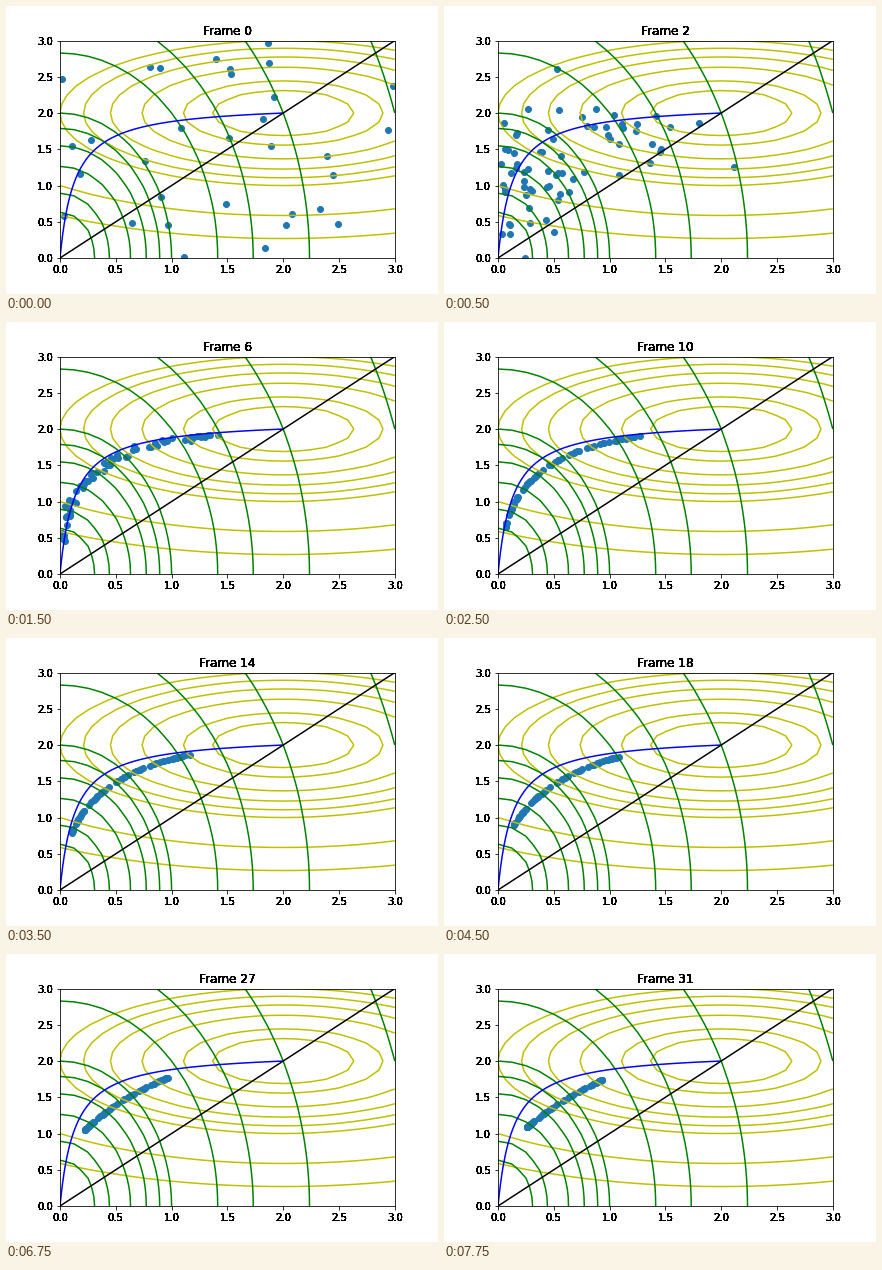
Write a matplotlib script that moves like this. It is 432 px wide and 288 px high and loops after 8 s.

```python
import numpy as np
import matplotlib.pyplot as plt
from matplotlib.animation import FuncAnimation

FRAMES, INTERVAL = 32, 250
LEVELS = [0.4, 0.8, 1.6, 2.4, 3.2, 4, 8, 12, 20, 40]
SETTLED = 6  # the frame by which the population lies on its arc

rng = np.random.default_rng(7)
start = rng.uniform(0, 3, (32, 2))
place = np.r_[0, np.sort(rng.random(68)), 1]
scatter = 0.3 * rng.standard_t(4, (len(place), 2))


def arc(age, t):
    """Quadratic Bezier arc that shortens and straightens with age."""
    shrink, bend = np.exp(-age / 13), np.exp(-age / 10)
    first = np.array([0.03 + 0.0092 * age, 1.2 - 0.76 * shrink])
    last = np.array([0.85 + 0.58 * shrink, 1.93 - 0.0076 * age])
    control = (first + last) / 2 + bend * np.array([-0.68, 0.62])
    t = t[:, None]
    return (1 - t) ** 2 * first + 2 * t * (1 - t) * control + t ** 2 * last


def population(frame):
    if frame == 0:
        return start
    age = max(0, frame - SETTLED)
    # Points drift towards both ends of the arc
    pull = 0.8 * age / (FRAMES - 1 - SETTLED)
    t = place - pull * np.sin(2 * np.pi * place) / (2 * np.pi)
    return np.abs(arc(age, t) + scatter * 0.5 ** (frame - 2))


def harden(image, dpi):
    """Make the soft edges of lettering almost solid."""
    image[..., 3] = np.minimum(1, 6 * image[..., 3])
    return image, 0, 0


fig = plt.figure(figsize=(6, 4), dpi=72, facecolor="white")
ax = fig.add_axes([0.125, 0.125, 0.775, 0.755], xlim=(0, 3), ylim=(0, 3))

dots = ax.scatter([], [])
x, y = np.meshgrid(np.linspace(0, 3, 25), np.linspace(0, 3, 25))
ax.contour(x, y, (x - 2) ** 2 + 4 * (y - 2) ** 2, LEVELS, colors="y")
ax.contour(x, y, 4 * x ** 2 + y ** 2, LEVELS, colors="g")

# Best trade-offs between the two bowls
a = np.linspace(0, 1, 200)
ax.plot(2 * (1 - a) / (1 + 3 * a), 8 * (1 - a) / (4 - 3 * a), "b")
ax.plot([0, 3], [0, 3], "k")

title = ax.set_title("")
for text in [title, *ax.get_xticklabels(), *ax.get_yticklabels()]:
    text.set_agg_filter(harden)


def update(frame):
    dots.set_offsets(population(frame))
    title.set_text(f"Frame {frame}")
    return [dots, title]


anim = FuncAnimation(fig, update, frames=FRAMES, interval=INTERVAL,
                     repeat=True, repeat_delay=0)
plt.show()
```
